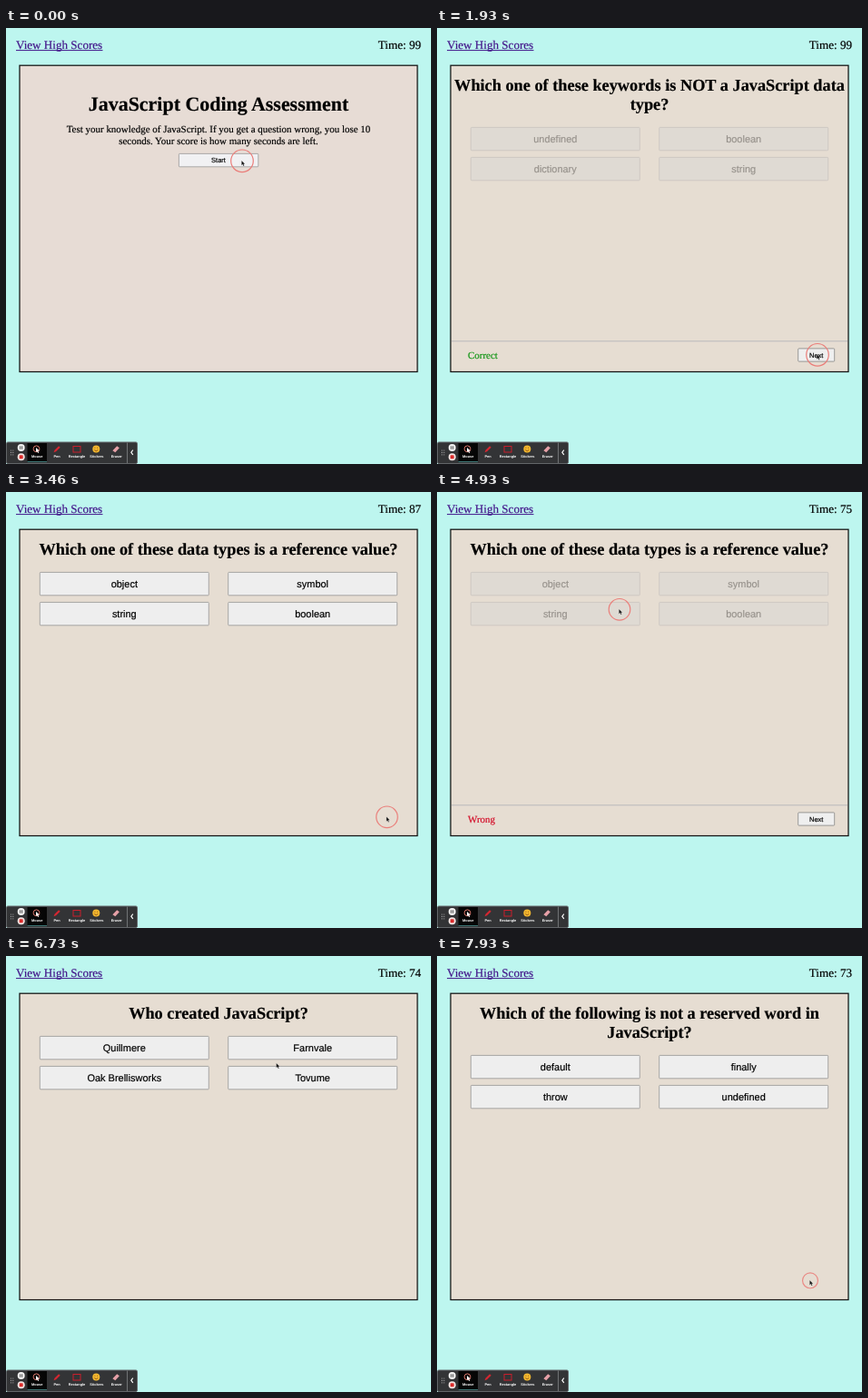
An HTML page that plays this animation: 468x480 px, repeating every 8000 ms.

```html
<!DOCTYPE html>
<html lang="en">
<head>
<meta charset="utf-8">
<title>Coding quiz</title>
<style>
  html, body { margin: 0; width: 100%; height: 100%; overflow: hidden; background: #bdf6ef; }
  svg { display: block; width: 468px; height: 480px; }
  text { color: #000; fill: currentColor; stroke: currentColor; stroke-width: .18; text-rendering: geometricPrecision; }
  .serif { font-family: "Liberation Serif", "Times New Roman", serif; }
  .sans { font-family: "Liberation Sans", Arial, sans-serif; }
  .mid { text-anchor: middle; }
  .end { text-anchor: end; }
  .bold { font-weight: bold; }
  .off { color: #98938d; }
  .link { color: #42148a; }
  .Correct { color: #0b930f; }
  .Wrong { color: #d30a26; }
  .tool { color: #fff; stroke: none; }
</style>
</head>
<body>
<svg viewBox="0 0 468 480">
  <rect width="468" height="480" fill="#bdf6ef"/>
  <text class="serif link" x="11" y="23" font-size="13.1">View High Scores</text>
  <path d="M11 24.6H106.5" stroke="#42148a"/>
  <text id="clock" class="serif end" x="457" y="23" font-size="13.1"></text>
  <rect id="card" x="15" y="41.2" width="438" height="337.3" stroke="#111" stroke-width="1.25"/>
  <g id="scene"></g>
  <g id="bar"></g>
  <circle id="ring" fill="none" stroke="#ea7d79" stroke-width="1.2"/>
  <path id="arrow" d="M-.6-1V4.2L.6 3.1 1.5 5.1 2.4 4.7 1.5 2.8H3.1Z" fill="#111" stroke="#fff" stroke-opacity=".5" stroke-width=".3"/>
</svg>
<script>
const $ = id => document.getElementById(id);
const clamp = (v, lo, hi) => Math.min(hi, Math.max(lo, v));
const LOOP = 8000, HOLD = 120, REST = 140, SECOND = 740;

const reference = {
  head: ["Which one of these data types is a reference value?"],
  opts: ["object", "symbol", "string", "boolean"], verdict: "Wrong"
};
const rounds = [
  { head: ["Which one of these keywords is NOT a JavaScript data", "type?"],
    opts: ["undefined", "boolean", "dictionary", "string"], verdict: "Correct" },
  reference,
  reference,
  { head: ["Who created JavaScript?"],
    opts: ["Quillmere", "Farnvale", "Oak Brellisworks", "Tovume"], verdict: "Correct" },
  { head: ["Which of the following is not a reserved word in", "JavaScript?"],
    opts: ["default", "finally", "throw", "undefined"] }
];

// Click release times and places; they open and answer a round in turn.
const clicks = [
  [65, 260, 147],
  [800, 194, 158], [1990, 419, 360.5],
  [2760, 201, 132], [3450, 419.5, 358.5],
  [4920, 201, 130], [5720, 415, 359],
  [7130, 291, 104], [7850, 411, 358]
].map(([t, x, y]) => ({ t, x, y }));

const label = (s, x, y, size, cls) =>
  `<text class="${cls}" x="${x}" y="${y}" font-size="${size}">${s}</text>`;

const box = (x, y, w, h, fill, line) =>
  `<rect x="${x}" y="${y}" width="${w}" height="${h}" rx=".8" fill="${fill}" stroke="${line}" stroke-width=".8"/>`;

const dot = (x, y, r, fill) => `<circle cx="${x}" cy="${y}" r="${r}" fill="${fill}"/>`;

const line = (d, stroke, width = 1) =>
  `<path d="${d}" fill="none" stroke="${stroke}" stroke-width="${width}"/>`;

function intro() {
  return label("JavaScript Coding Assessment", 234, 91, 21.95, "serif mid bold") +
    label("Test your knowledge of JavaScript. If you get a question wrong, you lose 10", 234, 115.3, 10.98, "serif mid") +
    label("seconds. Your score is how many seconds are left.", 234, 128, 10.98, "serif mid") +
    box(190.4, 138.4, 87.4, 14.4, "#f1f1f3", "#9a9a9a") +
    label("Start", 234, 148.1, 7.5, "sans mid");
}

function question({ head, opts, verdict }, answered) {
  const top = 67.4 + 21 * head.length;
  const [fill, edge] = answered ? ["#dfdad3", "#c9c5bf"] : ["#eee", "#969696"];
  let out = head.map((s, i) => label(s, 234, 69 + 21.2 * i, 18.3, "serif mid bold")).join("");
  opts.forEach((s, i) => {
    const x = 37.3 + 207.4 * (i % 2), y = top + 33 * (i >> 1);
    out += box(x, y, 186, 25.4, fill, edge) +
      label(s, x + 93, y + 16.5, 10.98, "sans mid" + (answered ? " off" : ""));
  });
  if (answered) {
    out += line("M16 344.8H452", "#b9b8bb") +
      label(verdict, 34, 364.3, 10.98, "serif " + verdict) +
      box(397.7, 352.9, 40, 14.2, "#efefef", "#858585") +
      label("Next", 417.7, 362.6, 7.5, "sans mid");
  }
  return out;
}

function toolbar() {
  let out = `<rect x=".5" y="456" width="144" height="23.5" rx="1.5" fill="#333436" stroke="#626568"/>
    <rect x="23.5" y="457" width="21.5" height="21" fill="#060606"/>` +
    line("M23.5 477.5H45", "#3d7775") + line("M133.5 456.5V479", "#717375") +
    dot(16.7, 462, 4, "#f2f2f2") + line("M15.7 460.3v3.4M17.7 460.3v3.4", "#333", .9) +
    dot(16.7, 472.2, 4, "#f2e4e2") + `<rect x="14.7" y="470.2" width="4" height="4" rx=".7" fill="#dc2b2b"/>
    <circle cx="33.5" cy="463.3" r="3.4" fill="none" stroke="#ef8275" stroke-width=".9"/>
    <path d="M33 462v5l1.2-1 1.1 2 .9-.5-1-1.9h1.6Z" fill="#fff"/>
    <path d="M52.5 467.3l1-2.5 4.6-4.5 1.6 1.5-4.6 4.5Z" fill="#d42731"/>
    <rect x="74" y="460.5" width="8" height="6.5" fill="none" stroke="#c91f2c"/>` +
    dot(99.3, 463.5, 4, "#f4b92f") + line("M97.3 464.5q2 2.4 4 0M97.9 461.7v1M100.7 461.7v1", "#7d3d10", .8) +
    `<path d="M117.4 465.3l4.8-5.1 2.7 2-4.6 5.1Z" fill="#e7a1a8"/>` +
    line("M139.8 464.6l-2 2.6 2 2.6", "#fff", 1.1);
  for (let i = 0; i < 6; i++)
    out += dot(5.5 + 2.3 * (i % 2), 465 + 2.4 * (i >> 1), .6, "#aaa");
  ["Mouse", "Pen", "Rectangle", "Stickers", "Eraser"].forEach((s, i) =>
    out += label(s, 34.2 + 21.9 * i, 473.3, 3.9, "sans mid bold tool"));
  return out;
}

// The clock runs only while a round is open; a wrong answer costs 10.
function secondsLeft(t) {
  let open = 0, lost = 0;
  rounds.forEach(({ verdict }, i) => {
    const from = clicks[2 * i].t, to = clicks[2 * i + 1]?.t ?? LOOP;
    open += clamp(t - from, 0, to - from);
    if (verdict === "Wrong" && t >= to) lost += 10;
  });
  return 99 - lost - Math.floor(open / SECOND);
}

// Rest after each click, then glide to arrive as the next press begins.
function pointer(t, step) {
  const b = clicks[Math.min(step + 1, clicks.length - 1)], a = clicks[step] ?? b;
  const p = clamp((t - a.t - REST) / (b.t - a.t - REST - HOLD), 0, 1);
  const k = a === b ? 0 : 1 - (1 - p) ** 2;
  return [a.x + (b.x - a.x) * k, a.y + (b.y - a.y) * k];
}

// Quick growth on press, shrinking after release.
function ringSize(t) {
  const { t: up } = clicks.findLast(c => t >= c.t - HOLD);
  return t < up ? Math.min(1, (t - up + HOLD) / 50) : Math.max(0, 1 - (t - up) / 260);
}

let shown;
function draw(t) {
  const step = clicks.findLastIndex(c => t >= c.t);
  if (step !== shown) {
    shown = step;
    $("scene").innerHTML = step < 0 ? intro() : question(rounds[step >> 1], step % 2 === 1);
    $("card").setAttribute("fill", step < 0 ? "#e7dcd5" : "#e6ddd2");
  }
  $("clock").textContent = "Time: " + secondsLeft(t);
  const [x, y] = pointer(t, step), k = ringSize(t), ring = $("ring");
  $("arrow").setAttribute("transform", `translate(${x} ${y})`);
  ring.setAttribute("cx", x);
  ring.setAttribute("cy", y - .7);
  ring.setAttribute("r", 12.3 * k);
  ring.setAttribute("opacity", k ? .55 + .45 * k : 0);
}

$("bar").innerHTML = toolbar();
const start = performance.now();
function tick() {
  draw((performance.now() - start) % LOOP);
  requestAnimationFrame(tick);
}
tick();
</script>
</body>
</html>
```
